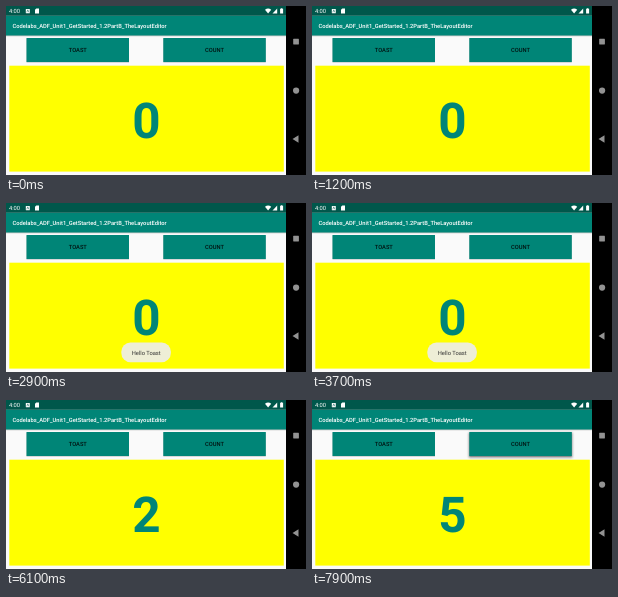
An HTML page that plays this animation: 300 px wide and 169 px high, repeating every 8 s.

```html
<!DOCTYPE html>
<html lang="en">
<head>
<meta charset="utf-8">
<title>Toast and count</title>
<style>
  html, body { margin: 0; width: 100%; height: 100%; overflow: hidden; background: #000; }
  svg { display: block; width: 100%; height: 100%; }
  text { font: 5.76px Roboto, sans-serif; text-rendering: geometricPrecision; }
  .medium { font-weight: 500; }
  .mid { text-anchor: middle; }
  .label { fill: #000; fill-opacity: .87; }
  .teal { fill: #008577; }
  .rest { fill: #000; opacity: .22; filter: blur(.6px); }
  .lift { fill: #000; opacity: 0; filter: blur(1.3px); }
  .digits text { font-size: 49.4px; font-weight: 700; fill: #008577; }

  .digits, .toast, .lift { animation: 8s linear infinite; }
  .digits { animation-name: count; animation-timing-function: step-end; }
  .toast { opacity: 0; animation-name: toast; }
  .toast-press { animation-name: press-toast; }
  .count-press { animation-name: press-count; }

  /* The digits stand one stage width apart. */
  @keyframes count {
    0% { transform: translateX(0); }
    55% { transform: translateX(-300px); }
    68.75% { transform: translateX(-600px); }
    81.25% { transform: translateX(-900px); }
    90% { transform: translateX(-1200px); }
    97.5%, 100% { transform: translateX(-1500px); }
  }
  @keyframes toast {
    0%, 32.5% { opacity: 0; }
    36.25%, 55.5% { opacity: 1; }
    60%, 100% { opacity: 0; }
  }
  @keyframes press-toast {
    0%, 27.5% { opacity: 0; }
    29%, 31.5% { opacity: .4; }
    33.5%, 100% { opacity: 0; }
  }
  @keyframes press-count {
    0%, 53% { opacity: 0; }
    54.2%, 55% { opacity: .4; }
    57%, 66.7% { opacity: 0; }
    68%, 68.8% { opacity: .4; }
    70.8%, 79.2% { opacity: 0; }
    80.5%, 81.3% { opacity: .4; }
    83.3%, 88% { opacity: 0; }
    89.3%, 90% { opacity: .4; }
    92%, 95.5% { opacity: 0; }
    97%, 100% { opacity: .4; }
  }
</style>
</head>
<body>
<svg viewBox="0 0 300 169" preserveAspectRatio="none">
  <rect width="300" height="169" fill="#fafafa"/>

  <!-- buttons -->
  <rect class="rest" x="20.5" y="32.6" width="102.5" height="24"/>
  <rect class="lift toast-press" x="19.9" y="32.7" width="103.7" height="25"/>
  <rect class="teal" x="20.5" y="32" width="102.5" height="24"/>
  <text class="label medium mid" x="71.8" y="46.1">TOAST</text>
  <rect class="rest" x="157.3" y="32.6" width="102.5" height="24"/>
  <rect class="lift count-press" x="156.7" y="32.7" width="103.7" height="25"/>
  <rect class="teal" x="157.3" y="32" width="102.5" height="24"/>
  <text class="label medium mid" x="208.5" y="46.1">COUNT</text>

  <!-- counter -->
  <rect x="3.3" y="59.7" width="274.5" height="105.9" fill="#ff0"/>
  <g class="digits mid">
    <text x="140.3" y="132">0</text>
    <text x="440.3" y="132">1</text>
    <text x="740.3" y="132">2</text>
    <text x="1040.3" y="132">3</text>
    <text x="1340.3" y="132">4</text>
    <text x="1640.3" y="132">5</text>
  </g>
  <g class="toast">
    <rect x="115.3" y="139.6" width="49.6" height="19.7" rx="9.2" fill="#eeeed6"/>
    <text class="mid" x="140.2" y="151.5" fill="#333">Hello Toast</text>
  </g>

  <!-- app bar -->
  <rect class="rest" y="11" width="280" height="19.3"/>
  <rect class="teal" y="9.8" width="280" height="19.7"/>
  <text class="medium" x="6.5" y="21.7" fill="#fff">Codelabs_ADF_Unit1_GetStarted_1.2PartB_TheLayoutEditor</text>

  <!-- status bar -->
  <rect width="280" height="9.8" fill="#00574b"/>
  <g fill="#fff">
    <text x="3" y="7.1">4:00</text>
    <rect x="19.8" y="2.9" width="4" height="4.4" rx=".5"/>
    <path d="M20.8 6.3L21.8 3.8L22.8 6.3" fill="none" stroke="#00574b" stroke-width=".5"/>
    <path d="M30.3 2.5H33V7.4H29V3.8Z"/>
    <path d="M259 3.8Q262.1 1.4 265.2 3.8L262.1 7.6Z"/>
    <path d="M266.5 7.5L271.2 2.5V7.5Z"/>
    <path d="M274.9 2.3H276.3V2.8H277.1V7.6H274.1V2.8H274.9Z"/>
  </g>

  <!-- navigation bar -->
  <rect x="280" width="20" height="169" fill="#000"/>
  <g fill="#929292">
    <rect x="287.2" y="32.8" width="5.7" height="5.7" rx=".4"/>
    <circle cx="290.1" cy="84.6" r="3.1"/>
    <path d="M286.5 133L292.5 129.3V136.7Z"/>
  </g>
</svg>
</body>
</html>
```
